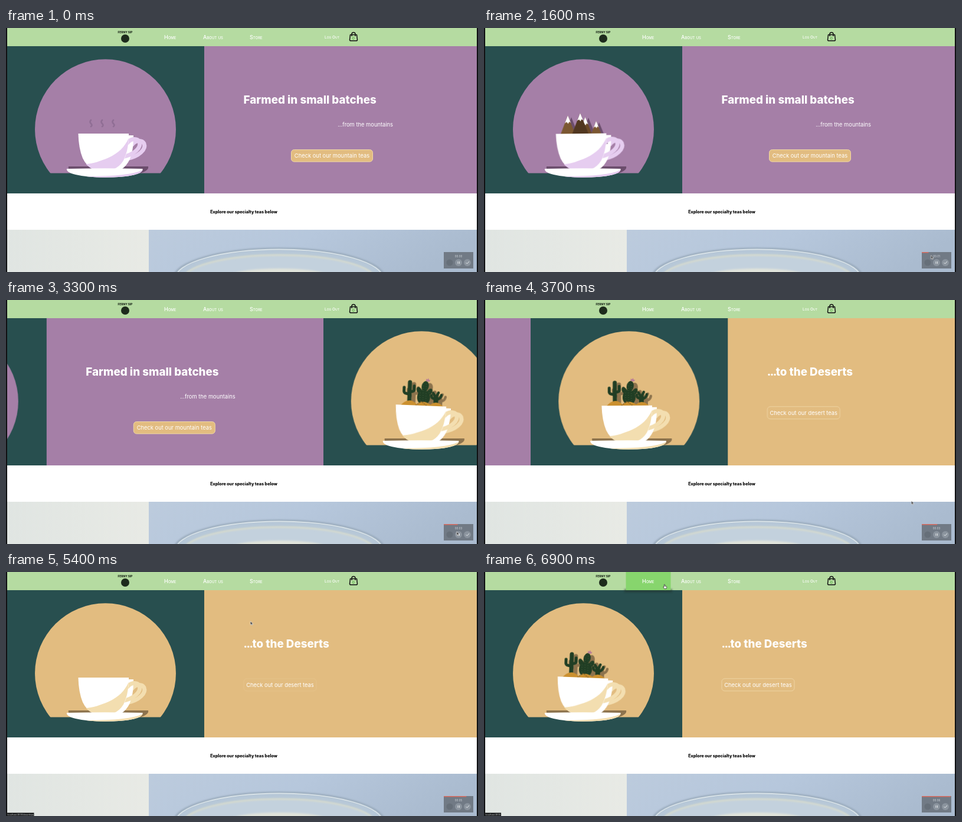
Write an HTML page that moves like this. It is 800x416 px and loops after 7000 ms.

```html
<!DOCTYPE html>
<html lang="en">
<head>
<meta charset="utf-8">
<title>Tea shop</title>
<style>
html, body { margin: 0; width: 100%; height: 100%; overflow: hidden; background: #fff; }
svg { display: block; width: 800px; height: 416px; font-family: Inter, "Open Sans", sans-serif; font-feature-settings: "calt" 0; }
.title { font-weight: 800; font-size: 18.8px; fill: #fff; }
.dots { letter-spacing: -1.6px; }
.light { font-weight: 400; font-size: 9.35px; fill: #fff; }
.nav { font-size: 9px; font-weight: 500; font-variant: small-caps; fill: #fff; }
.nav .minor { font-size: 6.5px; }
.tiny { font-size: 3.6px; fill: #dcdfe0; }

/* One tea slide; colours come from the theme */
.mountain { --base: #a57fa7; --tint: #e6cdf0; --dark: #6b4d6c; }
.desert { --base: #e2bc80; --tint: #f3deb0; --dark: #8d734d; }
.base { fill: var(--base); }
.tint { fill: var(--tint); }
.dark { fill: var(--dark); }
.handle { fill: none; stroke: var(--tint); stroke-width: 7; }
.shade .handle { stroke: var(--dark); }
.shade .body { fill: var(--dark); }
.body { fill: #fff; }

.track, .rock, .grow, .steam, .pointer, .arrow, .hand, .status, .hover, .edge, .bar, .secs {
  animation: 7s linear infinite;
}
.track { animation-name: slide; }
@keyframes slide {
  0%, 44.16% { transform: none; animation-timing-function: ease; }
  58.01%, 100% { transform: translateX(-803px); }
}

.rock { transform-origin: 168px 240px; animation-timing-function: ease-in-out; }
.mountain .rock { animation-name: rockA; }
.desert .rock { animation-name: rockB; }
@keyframes rockA {
  0%, 12.9% { transform: none; }
  18.5%, 39.6% { transform: rotate(-2.3deg); }
  29% { transform: rotate(2.3deg); }
  45%, 100% { transform: none; }
}
@keyframes rockB {
  0%, 36.6% { transform: rotate(-2.3deg); }
  47.1% { transform: rotate(2.3deg); }
  57.7% { transform: rotate(-2.3deg); }
  63.6%, 83.6% { transform: none; }
  88% { transform: rotate(-2.3deg); }
  98.6%, 100% { transform: rotate(2.3deg); }
}

.grow { transform-origin: 168px 184px; animation-timing-function: ease-out; }
.mountain .grow { animation-name: growA; }
.mountain .last { animation-name: growLast; }
.desert .grow { animation-name: growB; }
.mountain .late { animation-delay: -6.9s; }
@keyframes growA {
  0%, 9% { transform: scale(0); }
  13% { transform: scale(1.08); }
  15%, 33% { transform: none; }
  36.5%, 100% { transform: scale(0); }
}
@keyframes growLast {
  0%, 9% { transform: scale(0); }
  13% { transform: scale(1.08); }
  15%, 41% { transform: none; }
  44%, 100% { transform: scale(0); }
}
@keyframes growB {
  0%, 60% { transform: none; }
  64.5%, 85% { transform: scale(0); }
  89% { transform: scale(1.08); }
  91%, 100% { transform: none; }
}

.steam { animation-name: steam; fill: none; stroke: #7b5f83; stroke-width: 2.6; stroke-linecap: round; }
@keyframes steam {
  0% { opacity: .5; transform: none; }
  6%, 44% { opacity: 0; transform: translateY(-5px); }
  51%, 100% { opacity: .5; transform: none; }
}

.pointer { animation-name: pointer; }
@keyframes pointer {
  0% { transform: translate(757px, 387px); }
  22.86% { transform: translate(757.5px, 387.5px); }
  40% { transform: translate(759.5px, 391.5px); }
  47.14% { transform: translate(764px, 395px); }
  52.86% { transform: translate(724.5px, 342.5px); }
  60% { transform: translate(610px, 285px); }
  71% { transform: translate(470px, 200px); }
  74% { transform: translate(448px, 175px); }
  77.14% { transform: translate(414.5px, 84px); }
  84% { transform: translate(335px, 42px); }
  89% { transform: translate(300px, 20px); }
  98.57%, 100% { transform: translate(306px, 21px); }
}
.arrow { animation-name: arrow; animation-timing-function: step-end; }
.hand { animation-name: hand; animation-timing-function: step-end; }
@keyframes arrow {
  0% { opacity: 0; } 13% { opacity: 1; } 70.5% { opacity: 0; } 73.5% { opacity: 1; } 87%, 100% { opacity: 0; }
}
@keyframes hand {
  0% { opacity: 0; } 70.5% { opacity: 1; } 73.5% { opacity: 0; } 87%, 100% { opacity: 1; }
}
.status { animation-timing-function: step-end; }
.s1 { animation-name: statusTea; }
.s2 { animation-name: statusHome; }
@keyframes statusTea { 0% { opacity: 0; } 71% { opacity: 1; } 79.5%, 100% { opacity: 0; } }
@keyframes statusHome { 0% { opacity: 0; } 88%, 100% { opacity: 1; } }
.hover { animation-name: hover; }
@keyframes hover { 0%, 87% { opacity: 0; } 91%, 100% { opacity: 1; } }
.edge { animation-name: edge; }
@keyframes edge { 0%, 70.5% { opacity: 1; } 73%, 77.5% { opacity: .3; } 83%, 100% { opacity: 1; } }
.bar { animation-name: bar; transform-origin: 742px 0; }
@keyframes bar { from { transform: scaleX(0); } to { transform: none; } }
.secs { animation-name: secs; animation-timing-function: steps(7); }
@keyframes secs { to { transform: translateY(-49px); } }
</style>
</head>
<body>
<svg viewBox="0 0 800 416">
  <defs>
    <clipPath id="horizon"><rect y="31" width="336" height="216.5"/></clipPath>
    <clipPath id="photo"><rect y="344" width="800" height="72"/></clipPath>
    <clipPath id="clock"><rect x="755" y="386" width="26" height="7"/></clipPath>
    <linearGradient id="wall"><stop stop-color="#e0e5e2"/><stop offset="1" stop-color="#e8eae5"/></linearGradient>
    <linearGradient id="sky" x2="1" y2=".2">
      <stop stop-color="#bccbdd"/><stop offset=".5" stop-color="#b6c7dc"/><stop offset="1" stop-color="#aabbcf"/>
    </linearGradient>
    <filter id="soft" x="-20%" y="-50%" width="140%" height="200%"><feGaussianBlur stdDeviation="1.5"/></filter>

    <g id="cup">
      <path class="handle" d="M205 197C211 188 222 187 226 194C230 204 217 216 197 220"/>
      <path class="body" d="M122.5 180H208C208 200 206 214 199 226Q193 236 182 241H148Q136 235 130 222Q123 205 122.5 180Z"/>
    </g>
    <path id="cupTint" d="M207.8 188C201 203 191 213 174 221C160 227 148 231 135.5 232Q141 238 148 241H182Q193 236 199 226Q207 210 207.8 188Z"/>
    <g id="scene">
      <rect x="2" y="31" width="334" height="251" fill="#284f4f"/>
      <circle class="base" cx="168.5" cy="172.8" r="119.5" clip-path="url(#horizon)"/>
      <path class="dark" d="M106 236H241Q243 243 226 248H120Q104 244 106 236Z"/>
    </g>
    <g id="saucer">
      <path class="body" d="M103 240Q168 238.5 231.500 240Q233 246 217 250.5Q198 254.8 168 254.8T118 250Q102 246 103 240Z"/>
      <path class="tint" d="M231.500 242Q231 247 217 250.5Q198 254.8 168 254.8Q150 254.8 136 253Q210 253 231.500 242Z"/>
    </g>
    <g id="peak">
      <path d="M0 0L14.5 37H-14.5Z"/>
      <path fill="#fff" d="M0 0L5 12.5L2.5 10.5L.5 14L-2 11L-5 13Z"/>
    </g>
    <path id="peakShade" d="M0 0L14.5 37H-14.5Z"/>

    <g id="cacti" stroke="currentColor" fill="none" stroke-linecap="round" stroke-linejoin="round">
      <path stroke-width="7" d="M145 141V178"/>
      <path stroke-width="5" d="M135.500 150V157Q136 161 145 161M152.500 147V154Q152 157 145 157"/>
      <g fill="currentColor" stroke="none">
        <ellipse cx="169" cy="166" rx="11" ry="13"/>
        <ellipse cx="171" cy="147" rx="6" ry="9" transform="rotate(12 171 147)"/>
        <ellipse cx="161" cy="154" rx="4" ry="6" transform="rotate(-28 161 154)"/>
        <ellipse cx="179" cy="156" rx="4" ry="6" transform="rotate(35 179 156)"/>
      </g>
      <path stroke-width="8" d="M190 166V178"/>
      <path stroke-width="4.500" d="M182 162Q182 168 190 168M199 161Q198 168 190 169M188 163L185 158M191 163L194 157"/>
    </g>
  </defs>

  <rect width="800" height="416" fill="#fff"/>

  <g class="track">
    <g class="mountain">
      <rect class="base" x="336" y="31" width="469" height="251"/>
      <use href="#scene"/>
      <path class="steam" d="M144 157q-3 3 0 6t0 5M163 157q-3 3 0 6t0 5M182 157q-3 3 0 6t0 5"/>
      <g class="rock">
        <use class="shade" href="#cup" x="8" y="3"/>
        <g class="grow last">
          <use class="dark" href="#peakShade" x="149" y="152"/>
          <use href="#peak" x="143" y="149" fill="#7b5731"/>
        </g>
        <g class="grow late">
          <use class="dark" href="#peakShade" x="178" y="153"/>
          <use href="#peak" x="172.500" y="152" fill="#6b4928"/>
          <use href="#peak" x="164" y="145" fill="#513720"/>
        </g>
        <g class="grow">
          <use class="dark" href="#peakShade" x="196" y="161"/>
          <use href="#peak" transform="translate(191 159) scale(.85)" fill="#7b5731"/>
        </g>
        <use href="#cup"/>
        <use class="tint" href="#cupTint"/>
      </g>
      <use href="#saucer"/>
      <text class="title" x="402.500" y="128.500">Farmed in small batches</text>
      <text class="light" x="656" y="168" text-anchor="end">...from the mountains</text>
      <rect x="483.500" y="207.500" width="138" height="20.500" rx="5" fill="#e2bc80" stroke="#f1d9a6"/>
      <text class="light" x="552.500" y="221.300" text-anchor="middle">Check out our mountain teas</text>
    </g>

    <g class="desert" transform="translate(803)">
      <rect class="base" x="336" y="31" width="469" height="251"/>
      <use href="#scene"/>
      <g class="rock">
        <use class="shade" href="#cup" x="8" y="3"/>
        <g class="grow">
          <use href="#cacti" x="7" y="3" color="#8d734d"/>
          <use href="#cacti" color="#213e24"/>
          <path stroke="#4d6645" stroke-width=".8" stroke-dasharray="1 3" d="M163 158V176M168 142V176M173 143V176M178 153V160"/>
          <path fill="#b87b96" d="M172 138l0-4 2 1.500 2-2.500 1 3 2.500 0-2 3z"/>
          <path fill="#cb902f" d="M129 183Q143 164 158 178Q169 169 181 178Q193 168 205 183Z"/>
          <path fill="none" stroke="#81602b" stroke-width="1.500" stroke-dasharray="2 1.500" d="M156 180L165 173L175 180"/>
        </g>
        <use href="#cup"/>
        <use class="tint" href="#cupTint"/>
      </g>
      <use href="#saucer"/>
      <text class="title" x="402.500" y="128.500"><tspan class="dots">...</tspan>to the Deserts</text>
      <rect class="edge" x="403" y="181.800" width="123" height="21" rx="5" fill="none" stroke="#eed3a2"/>
      <text class="light" x="464.500" y="196.200" text-anchor="middle">Check out our desert teas</text>
    </g>
  </g>

  <text x="403" y="316" text-anchor="middle" font-size="7.100" font-weight="800">Explore our specialty teas below</text>

  <g clip-path="url(#photo)">
    <rect y="344" width="242" height="72" fill="url(#wall)"/>
    <rect x="242" y="344" width="558" height="72" fill="url(#sky)"/>
    <ellipse cx="463" cy="426" rx="178" ry="51" fill="#b7c8d8"/>
    <ellipse cx="463" cy="430" rx="166" ry="44" fill="#c3d1dd"/>
    <g fill="none">
      <ellipse cx="463" cy="426" rx="178" ry="50" stroke="#8fa0b1" stroke-width="2.500" filter="url(#soft)"/>
      <ellipse cx="463" cy="427" rx="176" ry="49.500" stroke="#d9e3e8" stroke-width="1.800"/>
      <ellipse cx="463" cy="430" rx="164" ry="43" stroke="#d9dcca" stroke-width="2.500" filter="url(#soft)"/>
    </g>
    <ellipse cx="463" cy="424" rx="84" ry="14" fill="#e0e3da" filter="url(#soft)"/>
  </g>

  <rect width="800" height="31" fill="#b5dba1"/>
  <g class="hover">
    <rect x="238" y="29" width="81" height="5.500" fill="#24352f" opacity=".55" filter="url(#soft)"/>
    <rect x="240.500" width="76" height="31" fill="#87d56d"/>
  </g>
  <circle cx="202" cy="18" r="7" fill="#1d2b1c"/>
  <text x="202" y="8.500" text-anchor="middle" font-size="4.800" font-weight="800" fill="#1d2b1c">FERNY SIP</text>
  <g class="nav">
    <text x="268" y="19">Home</text>
    <text x="334" y="19">About us</text>
    <text x="413" y="19">Store</text>
    <text class="minor" x="540" y="18">Log Out</text>
  </g>
  <path d="M583.500 11.500H594.500L595.500 20Q595.500 21.800 593.500 21.800H584.500Q582.500 21.800 582.500 20ZM586 14V10.500Q586 7.500 589 7.500T592 10.500V14" fill="none" stroke="#111" stroke-width="1.500" stroke-linejoin="round"/>
  <text x="588.800" y="19.800" text-anchor="middle" font-size="6.500" fill="#3fa52c">0</text>

  <g>
    <rect x="742" y="382" width="50" height="28" fill="#6d757f" opacity=".92"/>
    <rect class="bar" x="742" y="382" width="50" height="1.500" fill="#d9695c"/>
    <g clip-path="url(#clock)" font-size="4.500" fill="#d8dde2" text-anchor="middle">
      <g class="secs">
        <text x="767" y="391">00:00</text><text x="767" y="398">00:01</text><text x="767" y="405">00:02</text>
        <text x="767" y="412">00:03</text><text x="767" y="419">00:04</text><text x="767" y="426">00:05</text>
        <text x="767" y="433">00:06</text>
      </g>
    </g>
    <circle cx="752" cy="400" r="5.500" fill="#666f79"/>
    <circle cx="767" cy="400" r="6" fill="#8b949e"/>
    <circle cx="782" cy="400" r="6" fill="#8b949e"/>
    <path d="M766 398V402M768.500 398V402M779.500 400L781.500 402L785 398" fill="none" stroke="#e3e7ea"/>
  </g>

  <path d="M0 0H2V416H0ZM798 0H800V416H798Z" fill="#111214"/>

  <g class="status s1">
    <rect y="410.500" width="47.500" height="5.500" fill="#161819"/>
    <text class="tiny" x="2.500" y="414.700">localhost:3000/desertteas</text>
  </g>
  <g class="status s2">
    <rect y="410.500" width="29" height="5.500" fill="#161819"/>
    <text class="tiny" x="2.500" y="414.700">localhost:3000</text>
  </g>

  <g class="pointer" stroke="#222" stroke-width=".7" fill="#fff">
    <path class="arrow" fill="#333" stroke="#eee" d="M0 0V6.200L1.500 4.900L2.500 7L3.500 6.500L2.600 4.500H4.400Z"/>
    <path class="hand" d="M-.8 .5Q0 -.3 .7 .5V3L3.300 3.500Q4 4 3.700 5L3 7.500H-.3L-2.400 4.500Q-2 3.500 -.8 4.500Z"/>
  </g>
</svg>
</body>
</html>
```
